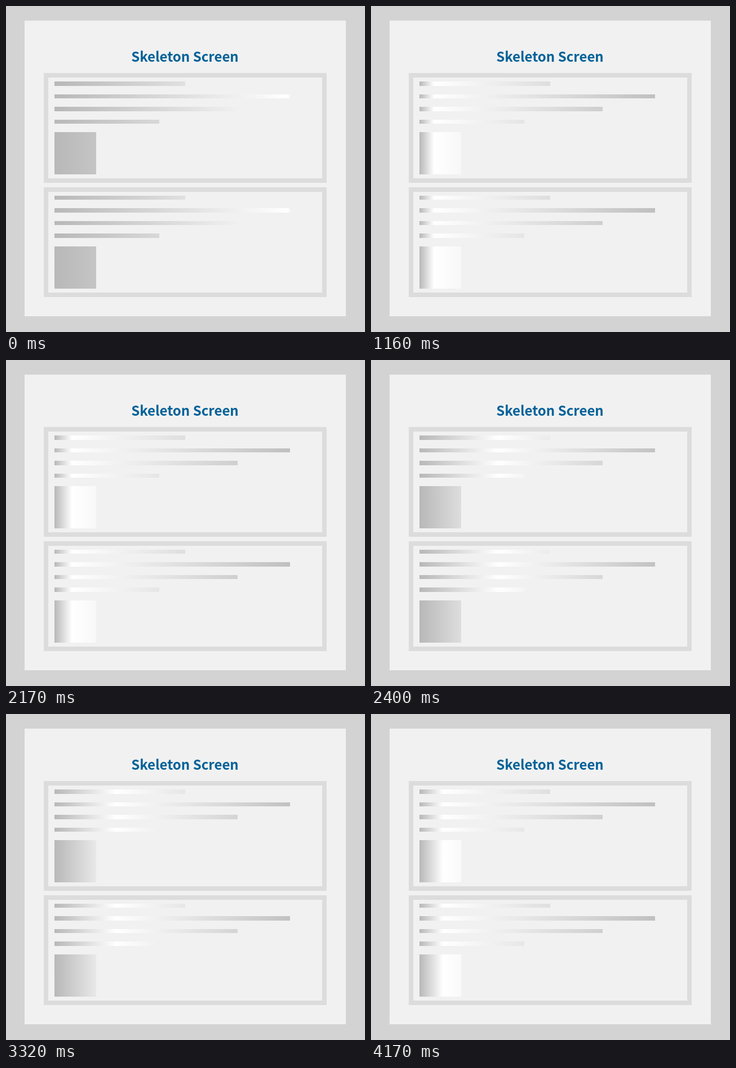
An HTML page with a canvas that plays this animation: 637 by 579 pixels, repeating every 4260 ms.

```html
<!DOCTYPE html>
<html lang="en">
<head>
<meta charset="utf-8">
<title>Skeleton Screen</title>
<style>
  html, body { margin: 0; height: 100%; overflow: hidden; background: #d3d3d3; }
  canvas { display: block; }
</style>
</head>
<body>
<canvas id="stage" width="637" height="579"></canvas>
<script>
const ctx = document.getElementById('stage').getContext('2d');
const LOOP = 4260;
const TICK = 77.2, LAST_TICK = 54;
const LEFT = 86, WIDTH = 464;
const BAR_WIDTHS = [0.5, 0.9, 0.7, 0.4];
const LONGEST = Math.max(...BAR_WIDTHS);

// Highlight position as a fraction of WIDTH; it sweeps at constant speed and wraps.
const highlightAt = tick => (0.889 + 0.0778 * tick) % 1;

// Brightness from 0 to 1 at fraction x for a highlight at peak.
const glow = (x, peak) => x < peak ? x / peak : (1 - x) / (1 - peak);

// True when moving the highlight from a to b visibly alters the bars.
function differs(a, b) {
  return [a, b]
    .map(x => Math.min(x, LONGEST))
    .some(x => Math.abs(glow(x, a) - glow(x, b)) > 0.24);
}

// The picture holds until the change since the last repaint is visible.
function heldHighlight(lastTick) {
  let held = highlightAt(0);
  for (let tick = 1; tick <= lastTick; tick++) {
    const next = highlightAt(tick);
    if (differs(held, next)) held = next;
  }
  return held;
}

function rect(color, x, y, w, h) {
  ctx.fillStyle = color;
  ctx.fillRect(x, y, w, h);
}

// Fills a box whose edges snap to whole pixels.
function snapped(fill, y, w, h) {
  const top = Math.round(y);
  rect(fill, LEFT, top, Math.round(w), Math.round(y + h) - top);
}

function drawCard(boxTop, contentTop, shimmer) {
  rect('#dcdcdc', 67, boxTop, 502, 195);
  rect('#f1f1f1', 75, boxTop + 8, 486, 179);
  BAR_WIDTHS.forEach((w, i) => snapped(shimmer, contentTop + 22.5 * i, w * WIDTH, 7.5));
  snapped(shimmer, contentTop + 90, 0.16 * WIDTH, 75);
}

function draw(time) {
  rect('#d3d3d3', 0, 0, 637, 579);
  rect('#f1f1f1', 33, 26, 570, 525);

  ctx.fillStyle = '#006198';
  ctx.font = 'bold 24px "Noto Sans CJK SC", "Noto Sans CJK JP", "Noto Sans CJK", sans-serif';
  ctx.textAlign = 'center';
  ctx.fillText('Skeleton Screen', 317.5, 99);

  const tick = Math.min(LAST_TICK, Math.floor(time / TICK + 0.22));
  const shimmer = ctx.createLinearGradient(LEFT, 0, LEFT + WIDTH, 0);
  shimmer.addColorStop(0, '#b8b8b8');
  shimmer.addColorStop(heldHighlight(tick), '#fff');
  shimmer.addColorStop(1, '#b8b8b8');
  drawCard(119, 134, shimmer);
  drawCard(322, 336.5, shimmer);
}

const start = performance.now();
function frame() {
  draw((performance.now() - start) % LOOP);
  requestAnimationFrame(frame);
}
frame();
</script>
</body>
</html>
```
